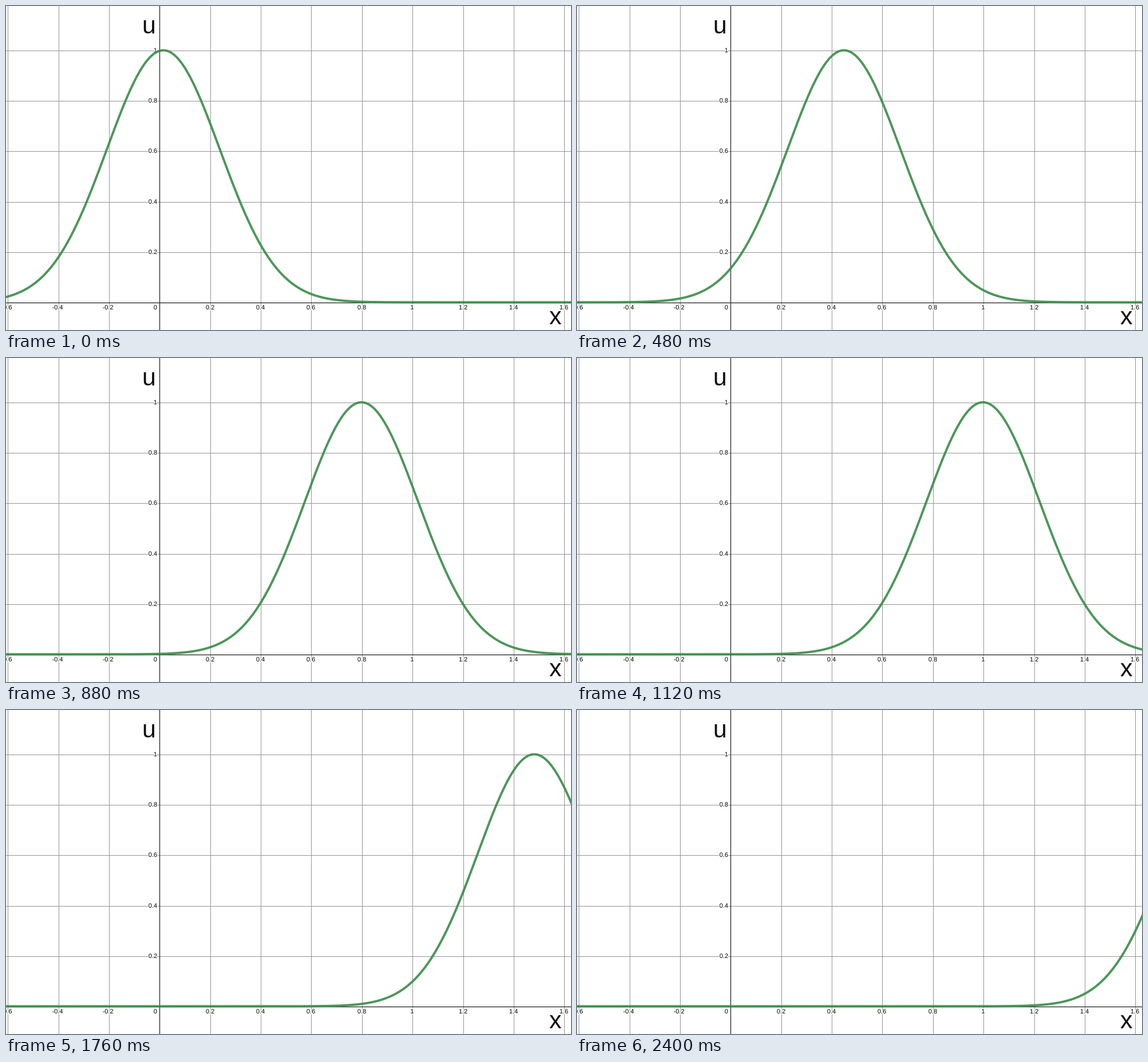
Recreate the animation shown at these times as a matplotlib script. Size 987 px wide and 567 px high, loop 2480 ms.

```python
import numpy as np
import matplotlib.pyplot as plt
from matplotlib import patheffects
from matplotlib.animation import FuncAnimation

W, H, DPI = 987, 567, 64    # a power of two keeps the pixel size exact
FRAMES, INTERVAL = 31, 80
X0, Y0 = 267.5, 518.5       # pixel position of the origin
SX, SY = 441.8, 441.0       # pixels per unit
STEP = 0.2
SHARPNESS = 10              # u = exp(-SHARPNESS * (x - c)^2)
TICKS = 60                  # the centre moves in steps of 1/60

plt.rcParams["font.family"] = "Liberation Sans"


def px(size):
    return size * 72 / DPI


fig = plt.figure(figsize=(W / DPI, H / DPI), dpi=DPI, facecolor="white")
ax = fig.add_axes([0, 0, 1, 1])
ax.set_xlim(0, W)
ax.set_ylim(H, 0)
ax.axis("off")


def rule(x=None, y=None, color="#949494", width=1.0, z=1):
    xs, ys = ([x, x], [0, H]) if y is None else ([0, W], [y, y])
    ax.plot(xs, ys, color=color, lw=px(width), zorder=z)


def label(x, y, text, ha):
    halo = patheffects.withStroke(linewidth=px(3), foreground="white")
    ax.text(x, y, text, fontsize=px(11), color="black", ha=ha,
            va="baseline", zorder=3, path_effects=[halo])


def number(k):
    return f"{k * STEP:.1f}".removesuffix(".0")


for k in range(-3, 9):
    x = round(X0 - 0.1 + 88.36 * k) + 0.5
    if k:
        rule(x=x)
        label(x - 1.5 * (k < 0), 531, number(k), "center")

for k in range(1, 6):
    y = round(Y0 - 0.6 - 88.2 * k) + 0.5
    rule(y=y)
    label(264, y + 3.5, number(k), "right")

rule(x=X0, color="#303030", width=1.4, z=2)
rule(y=Y0, color="#303030", width=1.4, z=2)
label(264, 531, "0", "right")

for x, y, name in ((249.5, 47.5, "u"), (959.5, 557.3, "x")):
    ax.text(x, y, name, fontsize=px(43), color="#111111", ha="center",
            va="baseline", zorder=3)

cols = np.linspace(-6, W + 6, 700)
curve, = ax.plot(cols, cols * 0, color="#388c46", alpha=0.9, lw=px(4),
                 solid_joinstyle="round", zorder=4)

# The wave drifts right at a slightly uneven pace: (frame, centre in ticks).
KEY_FRAMES = [0, 4, 8, 14, 18, 22, 30]
KEY_TICKS = [1, 19, 35, 60, 76, 89, 117]


def update(i):
    center = np.rint(np.interp(i, KEY_FRAMES, KEY_TICKS)) / TICKS
    x = (cols - X0) / SX
    curve.set_ydata(Y0 - SY * np.exp(-SHARPNESS * (x - center) ** 2))
    return curve,


anim = FuncAnimation(fig, update, frames=FRAMES, interval=INTERVAL,
                     repeat=True, repeat_delay=0)
plt.show()
```
